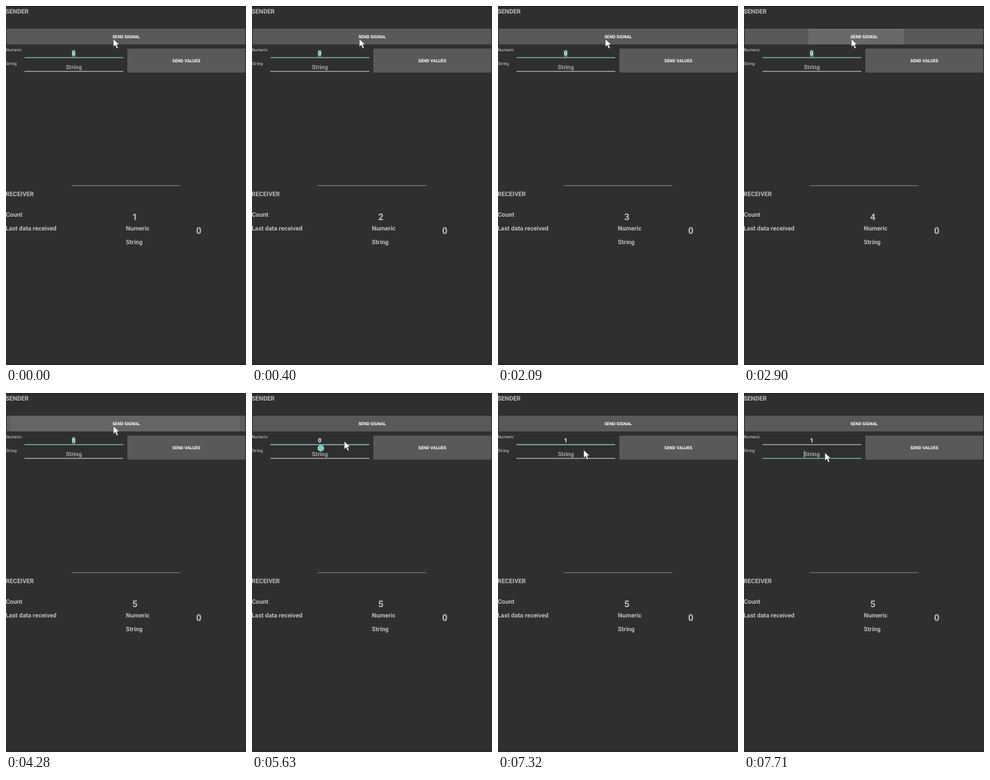
An HTML page for the animation above (8 s loop, 350 by 523 pixels).

```html
<!DOCTYPE html>
<html lang="en">
<head>
<meta charset="utf-8">
<title>Sender and receiver</title>
<style>
  html, body { margin: 0; width: 100%; height: 100%; overflow: hidden; background: #2f2f2f; }
  svg { display: block; width: 100%; height: 100%; }
  text { font: 700 9px Roboto, sans-serif; fill: #bcbcbc; text-rendering: geometricPrecision; }
  .label { font-weight: 400; font-size: 6.2px; fill: #d0d0d0; }
  .action { font-size: 6.35px; fill: #fff; }
  .field { font-size: 8.6px; }
  .value { font-size: 13.5px; }
  .action, .field, .value { text-anchor: middle; }
  .button { fill: #5a595a; }
  .hint { fill: #a2a2a2; }
  .entry { fill: #fff; }
  .accent { fill: #80cbc4; }
</style>
</head>
<body>
<svg viewBox="0 0 350 523">
  <rect width="350" height="523" fill="#2f2f2f"/>
  <rect width="350" height="1.5" fill="#242424"/>
  <rect y="520.5" width="350" height="2.5" fill="#282828"/>

  <text x="-.5" y="11">SENDER</text>
  <rect id="signal" class="button" x="1" y="33" width="348" height="23" rx="1"/>
  <rect id="ripple" y="33" height="23" rx="1"/>
  <text class="action" x="175.2" y="47">SEND SIGNAL</text>
  <rect class="button" x="177" y="62" width="172" height="35" rx="1"/>
  <text class="action" x="263" y="81.8">SEND VALUES</text>

  <text class="label" x="-.4" y="66.3">Numeric</text>
  <text class="label" x="-.4" y="86.3">String</text>
  <rect id="numericLine" x="27" y="74.6" width="144" height="1.4"/>
  <rect id="stringLine" x="27" y="94.6" width="144" height="1.4"/>
  <rect id="selection" x="96" y="64" width="5.2" height="10.5" fill="#4d7f7a"/>
  <text id="numeric" class="field" x="98.6" y="72"></text>
  <text class="field hint" x="98.9" y="92">String</text>
  <rect id="caret" class="accent" width="1" height="10.5"/>
  <path id="handle" class="accent" d="M100.4 74.8l3.4 2.1a4.9 4.9 0 1 1-6.8 0z"/>

  <rect x="96" y="261" width="158" height="1.3" fill="#707070"/>
  <text x="-.5" y="277.2">RECEIVER</text>
  <text x="-.3" y="306.5">Count</text>
  <text id="count" class="value" x="187.9" y="311.6"></text>
  <text x="-.5" y="326.8">Last data received</text>
  <text x="174.8" y="326.8">Numeric</text>
  <text class="value" x="281" y="332">0</text>
  <text x="174.8" y="346.8">String</text>

  <path id="cursor" d="M0 0V11.6L2.8 9L5 14L7 13.1L4.9 8.3H8.6Z" fill="#fff" stroke="#222" stroke-width=".5"/>
</svg>
<script>
const LOOP = 8000;
const $ = id => document.getElementById(id);
const set = (id, attributes) => {
  for (const [name, value] of Object.entries(attributes)) $(id).setAttribute(name, value);
};

// Each track lists [start time, value]; values hold until the next start.
const tracks = {
  count: [[0, 1], [400, 2], [1820, 3], [2900, 4], [4280, 5]],
  // left, right, fill
  ripple: [
    [0, null], [1820, [1, 349, '#6c6c6c']], [2090, null],
    [2900, [94, 233, '#696969']], [3050, [1, 349, '#6c6c6c']], [3200, null],
    [4280, [7, 341, '#656565']], [4400, null]
  ],
  signal: [[0, '#5a595a'], [4280, '#5f5e5f'], [4400, '#5a595a']],
  cursor: [
    [0, [156.5, 48]], [4400, [134.5, 70.3]], [5080, [138, 69]], [5200, [141, 66]],
    [5350, [134.5, 70.3]], [7200, [131, 75]], [7320, [125, 83]],
    [7440, [119, 89]], [7560, [118, 87]]
  ],
  numeric: [[0, '0'], [6090, ''], [6490, '1']],
  selection: [[0, 1], [5080, 0]],
  handle: [[0, 0], [5200, .5], [5350, 1], [6090, .6], [6240, 0]],
  caret: [
    [0, null], [5080, [100.6, 64]], [5630, null], [6090, [82, 64]],
    [6490, [101, 64]], [7080, null], [7710, [87.3, 84]]
  ],
  numericLine: [[0, '#78aba4'], [4400, '#8dbdb6'], [7710, '#a3a3a3']],
  stringLine: [[0, '#a3a3a3'], [7710, '#66aa96']]
};

const valueAt = (name, time) => tracks[name].findLast(([start]) => start <= time)[1];

function draw(time) {
  const at = name => valueAt(name, time);
  $('count').textContent = at('count');

  const [left, right, fill] = at('ripple') || [0, 0, 'none'];
  set('ripple', { x: left, width: right - left, fill });
  $('signal').style.fill = at('signal');

  const digits = at('numeric');
  $('numeric').textContent = digits || 'Numeric';
  set('numeric', { class: digits ? 'field entry' : 'field hint' });
  set('selection', { opacity: at('selection') });
  set('handle', { opacity: at('handle') });

  const caret = at('caret');
  const [x, y] = caret || [0, 0];
  set('caret', { x, y, opacity: caret ? 1 : 0 });

  for (const line of ['numericLine', 'stringLine']) set(line, { fill: at(line) });
  set('cursor', { transform: `translate(${at('cursor')})` });
}

const origin = performance.now();
function tick() {
  draw((performance.now() - origin) % LOOP);
  requestAnimationFrame(tick);
}
tick();
</script>
</body>
</html>
```
